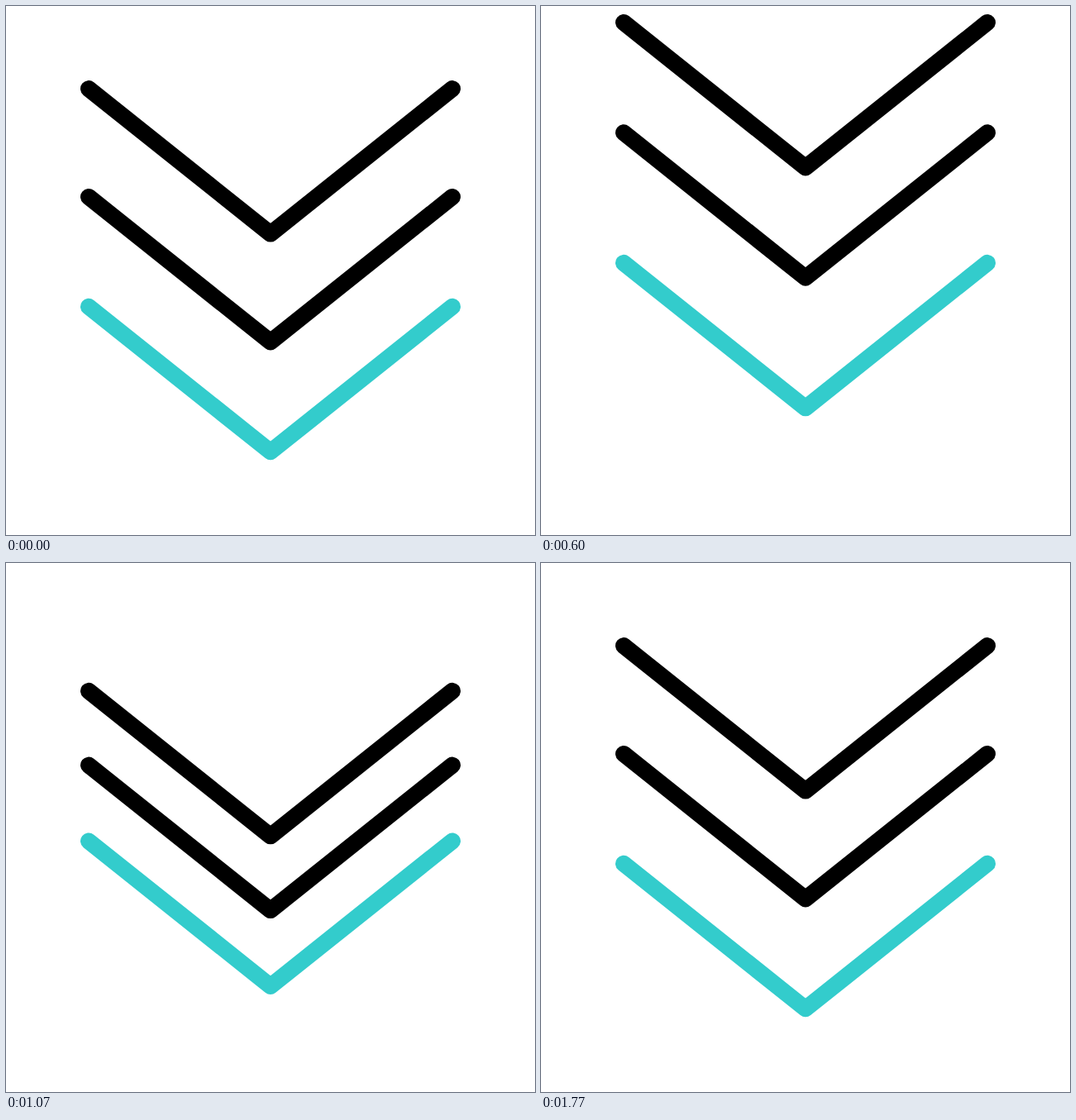
An HTML page without scripts for the animation above (2000 ms loop, 640 by 640 pixels).

```html
<!DOCTYPE html>
<html lang="en">
<head>
<meta charset="utf-8">
<title>Bouncing chevrons</title>
<style>
  @property --beat {
    syntax: "<number>";
    inherits: true;
    initial-value: 0;
  }

  html, body {
    margin: 0;
    width: 100%;
    height: 100%;
    overflow: hidden;
    background: #fff;
  }

  /* 60 beats per loop, 30 per second */
  svg {
    display: block;
    width: 100%;
    height: 100%;
    animation: tick 2s steps(60) -5ms infinite;
  }

  @keyframes tick {
    from { --beat: 0; }
    to { --beat: 60; }
  }

  /* Five eased swings: up, down, up, down, rest */
  .chevron {
    --t: calc(var(--beat) - var(--lag));
    --a: clamp(0, var(--t) / 15, 1);
    --b: clamp(0, (var(--t) - 15) / 11, 1);
    --c: clamp(0, (var(--t) - 26) / 8, 1);
    --d: clamp(0, (var(--t) - 34) / 8, 1);
    --e: clamp(0, (var(--t) - 42) / 7, 1);
    --y: calc(
      -81.2 * var(--a) * var(--a) * (3 - 2 * var(--a))
      + 154.6 * var(--b) * var(--b) * (3 - 2 * var(--b))
      - 119.4 * var(--c) * var(--c) * (3 - 2 * var(--c))
      + 104.7 * var(--d) * var(--d) * (3 - 2 * var(--d))
      - 58.7 * var(--e) * var(--e) * (3 - 2 * var(--e))
    );
    transform: translateY(calc(var(--y) * 1px));
    fill: none;
    stroke: #000;
    stroke-width: 20;
    stroke-linecap: round;
    stroke-linejoin: round;
  }

  .top { --lag: 4; }
  .middle { --lag: 2; }
  .bottom { --lag: 0; stroke: #33cccc; }
</style>
</head>
<body>
<svg viewBox="0 0 640 640">
  <path class="chevron top" d="M100 100.1l220 175.5 220-175.5"/>
  <path class="chevron middle" d="M100 230.9l220 175.5 220-175.5"/>
  <path class="chevron bottom" d="M100 363.8l220 175.5 220-175.5"/>
</svg>
</body>
</html>
```
